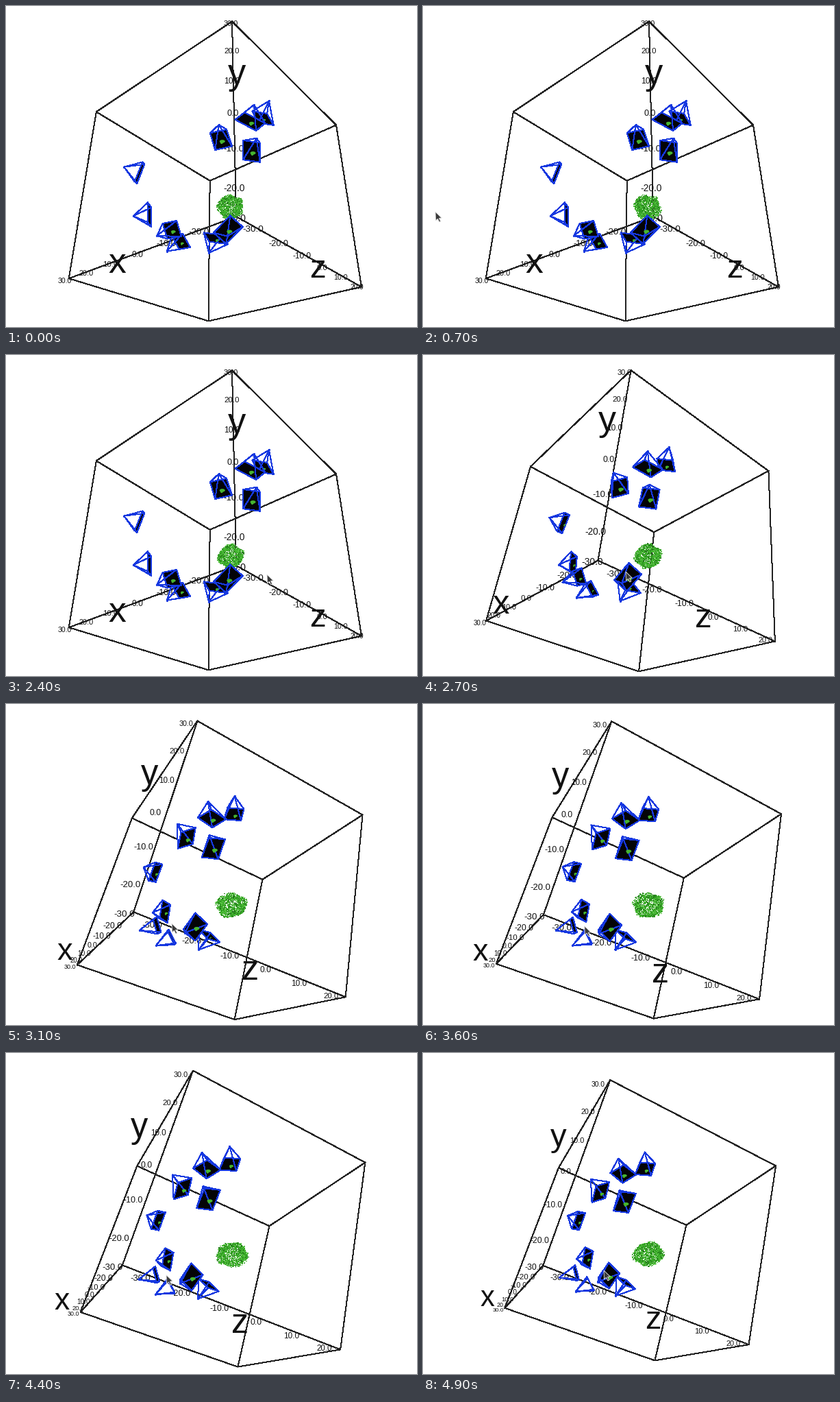
A matplotlib script for the animation above (5 s loop, 600 by 468 pixels).

```python
import numpy as np
import matplotlib.pyplot as plt
from matplotlib.animation import FuncAnimation
from matplotlib.patches import Ellipse, Polygon

W, H, DPI = 600, 468, 100
FRAMES, INTERVAL = 50, 100
PX = 72 / DPI
FONT = "Liberation Sans"
BLUE, GREEN = "#1638e0", "#46b52f"
CLOUD_GREENS = np.array(["#2f9c22", "#43b42f", "#5cc548", "#23751b"])

# Pinhole view: x right, y down, z away from the viewer
FOCAL, CENTRE = 690, np.array([310, 269])
PIVOT = np.array([1.6, 5.4, 152])

# Cube of side 60, turned by 40 degrees and seen from 30 degrees below
SIDE = 60
TURN, TILT = np.radians([40, 30])
CORNER = np.array([3.77, 5.51, 100])
BASIS = np.array([
    [-np.cos(TURN), np.sin(TURN) * np.sin(TILT), np.sin(TURN) * np.cos(TILT)],
    [0, -np.cos(TILT), np.sin(TILT)],
    [np.sin(TURN), np.cos(TURN) * np.sin(TILT), np.cos(TURN) * np.cos(TILT)],
])

CLOUD = np.array([4, 5.45, 153.5])
CLOUD_RADII = np.array([4.3, 4, 7.6])

# Orbit: time, yaw and pitch in degrees, step back
ORBIT = np.array([(2.4, 0, 0, 0), (2.7, 13, 1.15, 0), (3.1, 25.3, 0.4, 0),
                  (3.9, 28.6, -0.8, 0), (4.8, 28.6, -0.8, 0), (4.9, 29.5, -1.5, 7.5)])
# Pointer: time and tip
POINTER = np.array([(0.7, 18, 300), (1.2, 300, 340), (1.3, 400, 387), (1.4, 420, 389),
                    (1.8, 230, 340), (2.0, 64, 345), (2.4, 381, 320), (2.7, 296, 316),
                    (3.1, 242, 320), (3.9, 232, 326), (4.3, 228, 325), (4.9, 264, 317)])
ARROW = np.array([(0, 0), (0.5, 13), (3.4, 10.3), (5.8, 15), (7.8, 14),
                  (5.5, 9.4), (9.3, 9)])

# Axis: letter, direction, first value, tick values, tick shift, letter shift
AXES = [
    ("x", 0, -30, range(-30, 31, 10), (-1.2, -1.5, -2), (-1.8, -5.8, -8)),
    ("y", 1, -30, range(-20, 31, 10), (-2, -5, -3), (-7.2, 0, -8)),
    ("z", 2, -34.5, range(-30, 21, 10), (-1, -1.5, 0), (-2, -3.6, 0)),
]

# Cameras around the cloud: offset of the image plane and its roll
CAMERAS = [
    ((4.7, -24.3, -24.4), -47), ((8.7, -26.1, -18.4), 9),
    ((-3.3, -19.4, -24), -17), ((5.1, -16.2, -24.2), 9),
    ((-29.7, -11.2, 0.9), -6), ((-26.7, 2.5, 2.4), -22),
    ((-17.4, 5.9, -17.3), 80), ((-15.2, 9.8, -12.3), 78),
    ((-1.3, 5.4, -22.7), 43), ((-4.8, 9.4, -6.9), 95),
]
HALF_WIDTH, HALF_LENGTH, APEX_DISTANCE = 2.35, 3.4, 5.5


def keyed(keys, t):
    return [np.interp(t, keys[:, 0], column) for column in keys[:, 1:].T]


def make_projector(t):
    """Return a function from scene points to screen points and depths."""
    yaw, pitch, back = keyed(ORBIT, t)
    c, s = np.cos(np.radians(yaw)), np.sin(np.radians(yaw))
    cp, sp = np.cos(np.radians(pitch)), np.sin(np.radians(pitch))
    spin = np.array([[c, 0, s], [0, 1, 0], [-s, 0, c]])
    nod = np.array([[1, 0, 0], [0, cp, sp], [0, -sp, cp]])
    rotation = nod @ spin

    def project(scene):
        p = (np.atleast_2d(scene) - PIVOT) @ rotation.T + PIVOT + (0, 0, back)
        return CENTRE + FOCAL * p[:, :2] / p[:, 2:], p[:, 2]

    return project


def in_box(coords):
    return CORNER + np.asarray(coords, float) @ BASIS


def line(ax, a, b, color, zorder):
    ax.plot(*zip(a, b), color=color, lw=PX, antialiased=False, zorder=zorder)


def label(ax, project, coords, text, scale, drop):
    """Centred text that shrinks with depth."""
    (spot,), (depth,) = project(in_box(coords))
    size = scale / depth
    ax.text(spot[0], spot[1] + drop * size, text, family=FONT, size=size * PX,
            color="#111111", ha="center", va="baseline", zorder=2)


def draw_box(ax, project):
    corners = np.array(list(np.ndindex(2, 2, 2)))
    screen, _ = project(in_box(corners * SIDE))
    for i, a in enumerate(corners):
        for j in range(i):
            if np.abs(a - corners[j]).sum() == 1:
                line(ax, screen[i], screen[j], "#222222", 1)

    for letter, direction, first, values, tick_shift, letter_shift in AXES:
        along = np.eye(3)[direction]
        for value in values:
            label(ax, project, along * (value - first) + tick_shift,
                  f"{value:.1f}", 1370, 0.345)
        label(ax, project, along * SIDE / 2 + letter_shift, letter, 5550, 0.264)


def draw_cloud(ax, project, frame):
    rng = np.random.default_rng(frame)
    n = 1700
    ball = rng.normal(size=(n, 3))
    ball /= np.linalg.norm(ball, axis=1, keepdims=True)
    lumps = 1 + 0.09 * np.sin(5 * ball[:, :1] + 4 * ball[:, 1:2] + 0.2 * frame)
    ball *= rng.uniform(0.3, 1, (n, 1)) ** (1 / 3) * lumps
    screen, _ = project(CLOUD + CLOUD_RADII * ball)
    colors = rng.choice(CLOUD_GREENS, n, p=[0.3, 0.38, 0.17, 0.15])
    ax.scatter(*screen.T, s=(1.3 * PX) ** 2, c=colors, marker="s",
               linewidths=0, zorder=3)


def frustum(offset, roll):
    """Four image corners and the apex of a camera that looks at the cloud."""
    offset = np.array(offset)
    out = offset / np.linalg.norm(offset)
    right = np.array([-out[2], 0, out[0]]) / np.hypot(out[0], out[2])
    up = np.array([0, -1, 0]) + out[1] * out
    up /= np.linalg.norm(up)
    c, s = np.cos(np.radians(roll)), np.sin(np.radians(roll))
    length = HALF_LENGTH * (c * up + s * right)
    width = HALF_WIDTH * (c * right - s * up)
    middle = CLOUD + offset
    return np.array([middle - width + length, middle + width + length,
                     middle + width - length, middle - width - length,
                     middle + APEX_DISTANCE * out])


def draw_frustum(ax, shape, zorder):
    quad, apex = shape[:4], shape[4]
    ax.add_patch(Polygon(quad, fc="#040406", ec=BLUE, lw=PX,
                         antialiased=False, zorder=zorder))
    for corner in quad:
        line(ax, apex, corner, BLUE, zorder)
    ax.plot(*apex, "o", color=BLUE, ms=3.2 * PX, mew=0, zorder=zorder)

    (ax1, ay1), (ax2, ay2) = quad[2] - quad[0], quad[3] - quad[1]
    grow = min(1, abs(ax1 * ay2 - ay1 * ax2) / 1150)
    if grow > 0.3:
        x, y = quad.mean(axis=0) + (2, 2.5)
        for dx, dy, w, h in [(0, 0, 8, 4.5), (-1, 1.5, 4, 4.5)]:
            ax.add_patch(Ellipse((x + dx, y + dy), w * grow, h * grow,
                                 fc=GREEN, lw=0, zorder=zorder))


def draw_pointer(ax, t):
    if t >= POINTER[0, 0] - 1e-6:
        ax.add_patch(Polygon(ARROW + keyed(POINTER, t), fc="#3a3a3a", ec="#e4e4e4",
                             lw=0.9 * PX, zorder=9))


SHAPES = [frustum(offset, roll) for offset, roll in CAMERAS]
fig = plt.figure(figsize=(W / DPI, H / DPI), dpi=DPI, facecolor="white")
ax = fig.add_axes([0, 0, 1, 1])


def draw(frame):
    t = frame * INTERVAL / 1000
    project = make_projector(t)
    ax.clear()
    ax.set(xlim=(0, W), ylim=(H, 0))
    ax.axis("off")

    draw_box(ax, project)
    draw_cloud(ax, project, frame)
    views = [project(shape) for shape in SHAPES]
    views.sort(key=lambda view: -view[1][:4].mean())
    for layer, (screen, _) in enumerate(views):
        draw_frustum(ax, screen, 4 + layer / len(views))
    draw_pointer(ax, t)
    return []


anim = FuncAnimation(fig, draw, frames=FRAMES, interval=INTERVAL,
                     init_func=lambda: [], repeat=True, repeat_delay=0)
plt.show()
```
